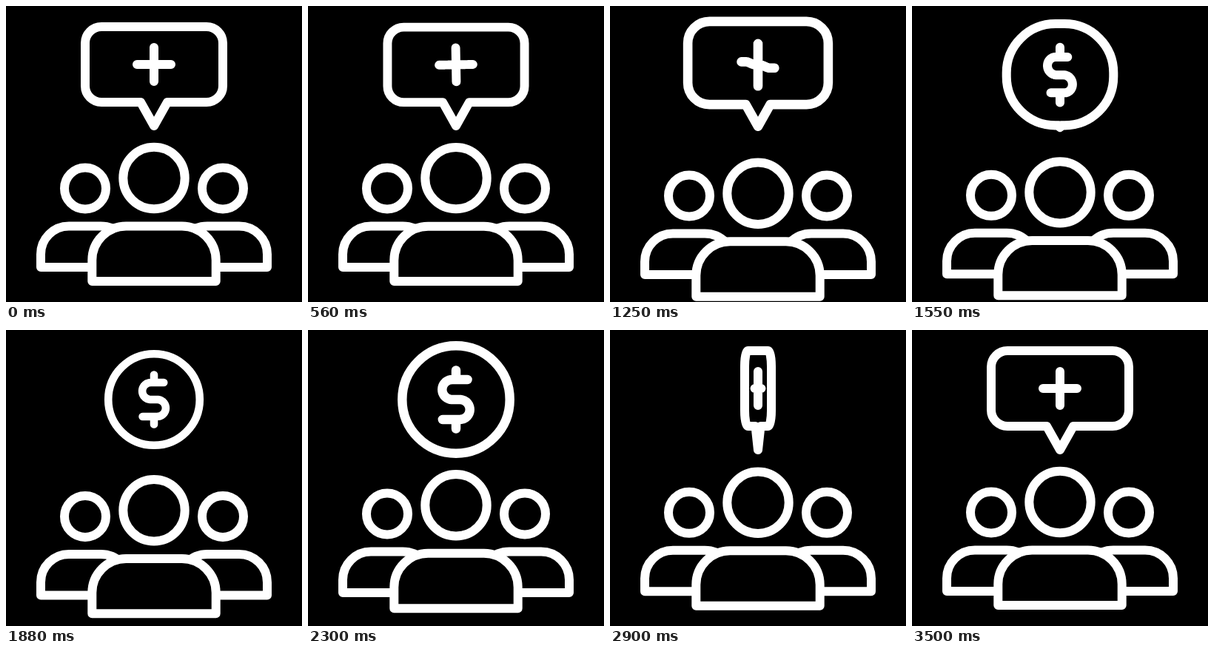
Recreate the animation shown at these times as an HTML page. Size 400 by 400 pixels, loop 3.53 s.

```html
<!DOCTYPE html>
<html lang="en">
<head>
<meta charset="utf-8">
<title>Team with speech bubble and coin</title>
<style>
  html, body { margin: 0; width: 100%; height: 100%; overflow: hidden; background: #000; }
  svg { display: block; width: 100%; height: 100%; }
  g { fill: none; stroke: #fff; stroke-width: 12; stroke-linecap: round; stroke-linejoin: round; }
</style>
</head>
<body>
<svg viewBox="0 0 400 400">
  <g id="sides">
    <circle cx="107" cy="246.5" r="28"/>
    <circle cx="293" cy="246.5" r="28"/>
    <path d="M130 353H47V335.5A38 38 0 0 1 85 297.5H128A40 40 0 0 1 168 337.5"/>
    <path d="M270 353H353V335.5A38 38 0 0 0 315 297.5H272A40 40 0 0 0 232 337.5"/>
  </g>
  <g id="leader">
    <circle cx="200" cy="232.5" r="41.7"/>
    <path fill="#000" d="M116.3 372V343.6A46 46 0 0 1 162.3 297.6H237.7A46 46 0 0 1 283.7 343.6V372Z"/>
  </g>
  <g id="top">
    <path id="outline"/>
    <path id="sign"/>
  </g>
</svg>
<script>
const LOOP = 3530, START = 530, STEP = 30, FLIP = 2857;
const $ = id => document.getElementById(id);
const clamp = x => Math.max(0, Math.min(1, x));
const mix = (a, b, k) => a + (b - a) * k;
const span = (t, a, b) => clamp((t - a) / (b - a));
const smooth = x => x * x * (3 - 2 * x);

// cubic-bezier(.333, 0, .1, 1)
function ease(x) {
  let lo = 0, hi = 1;
  for (let i = 0; i < 24; i++) {
    const s = (lo + hi) / 2, r = 1 - s;
    if (r * r * s + 0.3 * r * s * s + s * s * s < x) lo = s; else hi = s;
  }
  return smooth(lo);
}

// Bounce scale: [time, value]
const BOUNCE = [[530, 1], [790, 0.875], [1060, 1.07], [1640, 1],
                [1890, 0.882], [2175, 1.055], [2520, 1]];
function bounce(t) {
  let v = 1;
  for (let i = 1; i < BOUNCE.length; i++) {
    const [a, from] = BOUNCE[i - 1], [b, to] = BOUNCE[i];
    if (t >= a) v = mix(from, to, smooth(span(t, a, b)));
  }
  return v;
}

// Bubble with its tail; as m grows the edges shrink away and leave a circle
const CX = 200, CY = 94, R = 70;
function outlinePath(m, place) {
  const half = mix(93, R, m), top = mix(28, CY - R, m), base = mix(130, CY + R, m);
  const rad = mix(22, R, m), tail = mix(18, 0, m), tip = mix(162, CY + R, m);
  const hug = rad * 0.448;
  let d = '';
  for (const side of [1, -1]) {
    const p = (x, y) => place(side * x, y);
    d += 'M' + p(0, top) + 'L' + p(half - rad, top) +
      'C' + [p(half - hug, top), p(half, top + hug), p(half, top + rad)].join(' ') +
      'L' + p(half, base - rad) +
      'C' + [p(half, base - hug), p(half - hug, base), p(half - rad, base)].join(' ') +
      'L' + p(tail, base) + 'L' + p(0, tip);
  }
  return d;
}

// Point on the S of the dollar sign, u from 0 to 1
function dollarPoint(u) {
  const arc = Math.PI * 13;
  let d = u * (52.5 + 2 * arc);
  if (d < 20) return [15 - d, -26];
  d -= 20;
  if (d < arc) return [-5 - 13 * Math.sin(d / 13), -13 - 13 * Math.cos(d / 13)];
  d -= arc;
  if (d < 10) return [-5 + d, 0];
  d -= 10;
  if (d < arc) return [5 + 13 * Math.sin(d / 13), 13 - 13 * Math.cos(d / 13)];
  return [5 - (d - arc), 26];
}

function signPath(m, angle, place) {
  const cos = Math.cos(angle), sin = Math.sin(angle);
  const lead = Math.pow(m, 0.6), lag = Math.pow(m, 1.5), bend = Math.pow(m, 0.9);
  const mid = mix(79, CY, lead);
  const put = (x, y) => place(x * cos - y * sin, mid + x * sin + y * cos);
  const inner = 28 * m, outer = mix(23, 38, lead);
  let d = '';
  for (const s of [1, -1]) d += 'M' + put(0, s * inner) + 'L' + put(0, s * outer);
  const n = 60;
  for (let i = 0; i <= n; i++) {
    const u = i / n, [x, y] = dollarPoint(u);
    d += (i ? 'L' : 'M') + put(mix(46 * u - 23, x, lag), y * bend);
  }
  return d;
}

function draw(t) {
  const drop = ease(span(t, START, 1280)) - ease(span(t, 1280, 3500));
  $('leader').setAttribute('transform', `translate(0 ${20.7 * drop})`);
  $('sides').setAttribute('transform', `translate(0 ${10 * drop})`);

  const flipped = t >= FLIP;
  const m = flipped ? 0 : smooth(span(t, 1140, 1640));
  const angle = flipped ? 0 : Math.PI * (1 - ease(span(t, START, 1250)));
  const width = flipped ? 1 - Math.pow(1 - span(t, FLIP, 3477), 3)
                        : 1 - Math.pow(span(t, 2530, FLIP), 2.5);
  const scale = bounce(t), anchor = mix(163, CY, m);
  const place = (x, y) => [
    (CX + x * scale * width).toFixed(2),
    (anchor + (y - anchor) * scale).toFixed(2)
  ];
  $('top').style.strokeWidth = 12 * scale;
  $('outline').setAttribute('d', outlinePath(m, place));
  $('sign').setAttribute('d', signPath(m, angle, place));
}

const origin = performance.now();
function tick() {
  const t = (performance.now() - origin) % LOOP;
  draw(t < START ? 0 : START + Math.floor((t - START) / STEP) * STEP);
  requestAnimationFrame(tick);
}
tick();
</script>
</body>
</html>
```
